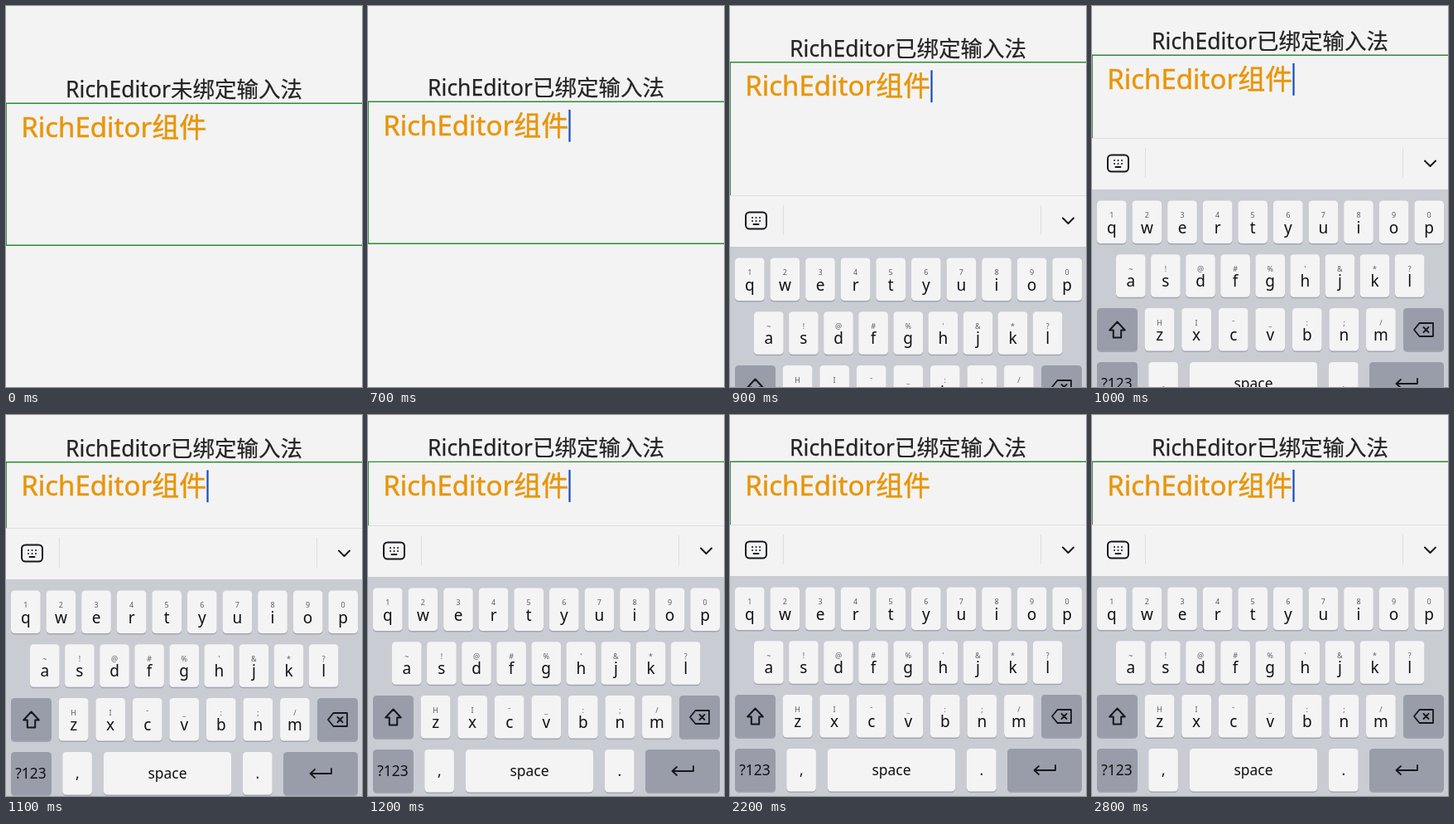
Animation, 430 px wide and 459 px high, one loop 2.9 s. Source, as an HTML page:

```html
<!DOCTYPE html>
<html lang="zh-CN">
<head>
<meta charset="utf-8">
<title>RichEditor</title>
<style>
  html, body { margin: 0; width: 100%; height: 100%; overflow: hidden; background: #f3f3f3; }
  svg { display: block; width: 430px; height: 459px; }
  text { font-family: "Noto Sans", "Noto Sans CJK SC", "Noto Sans CJK", sans-serif; fill: #111; }
  .mid { text-anchor: middle; }
  #title { font-size: 26.5px; fill: #242424; stroke: #242424; stroke-width: .25; }
  .content { font-size: 33px; fill: #e8960a; stroke: #e8960a; stroke-width: .5; }
  .hint { font-size: 9px; fill: #5c5e63; }
  .letter { font-size: 19px; }
  .word { font-size: 17.4px; }
  .icon { fill: none; stroke: #15171a; stroke-width: 2; stroke-linejoin: round; stroke-linecap: round; }
  .rule { stroke: #dddee0; }
</style>
</head>
<body>
<svg viewBox="0 0 430 459">
  <rect width="430" height="459" fill="#f3f3f3"/>
  <!-- Origin: top border of the editor -->
  <g id="editor">
    <text id="title" class="mid" x="215" y="-7.2"></text>
    <path d="M431 0H.2V171H431" fill="none" stroke="#2c8c35" stroke-width="1.4"/>
    <text class="content" x="18.2" y="40.5">RichEditor组件</text>
    <rect id="caret" x="242.4" y="9.7" width="2.2" height="38.8" fill="#164fb8"/>
  </g>
  <!-- Origin: top edge of the toolbar -->
  <g id="keyboard">
    <rect width="430" height="62" fill="#f3f3f4"/>
    <path class="rule" d="M0 .5H430M64.5 12V48M375.5 12V48"/>
    <rect y="62" width="430" height="270" fill="#c9ccd3"/>
    <g id="keys"></g>
    <g class="icon">
      <rect x="19" y="20.5" width="25" height="20" rx="4.5"/>
      <path d="M27 27h.1M31.5 27h.1M36 27h.1M27 31h.1M31.5 31h.1M36 31h.1M28.5 35h6" stroke-width="1.9"/>
      <path d="M402 27.5l6.5 6.5l6.5-6.5"/>
      <path d="M30.5 221.5l9.3 10h-4.6v9h-9.4v-9h-4.6z"/>
      <path d="M389 231l6.5-8h16.5v16h-16.5zM400.5 228l6 6M406.5 228l-6 6" stroke-width="1.8"/>
      <path d="M393 290v6h-25M373 291l-5.5 5l5.5 5" stroke-width="1.8"/>
    </g>
  </g>
</svg>
<script>
const LOOP = 2900, STEP = 100;
const byId = id => document.getElementById(id);
const [editor, title, caret, keyboard, keys] =
  ['editor', 'title', 'caret', 'keyboard', 'keys'].map(byId);

function add(tag, attrs, text = '') {
  const node = document.createElementNS('http://www.w3.org/2000/svg', tag);
  for (const name in attrs) node.setAttribute(name, attrs[name]);
  node.textContent = text;
  keys.append(node);
}

function addKey(x, y, width, fill = '#f4f4f5') {
  const box = { x, width, height: 51.5, rx: 4.5 };
  add('rect', { ...box, y: y + 1.5, fill: '#a3a7b1' });
  add('rect', { ...box, y, fill });
}

function addRow(letters, hints, x, y, pitch) {
  [...letters].forEach((letter, i) => {
    const left = x + i * pitch, center = left + 17.8;
    addKey(left, y, 35.6);
    add('text', { class: 'mid hint', x: center, y: y + 20.5 }, hints[i]);
    add('text', { class: 'mid letter', x: center, y: y + 39 }, letter);
  });
}

const DARK = '#999da9';
addRow('qwertyuiop', '1234567890', 6, 75.5, 42.6);
addRow('asdfghjkl', "~!@#%'&*?", 29, 140.3, 42.1);
addRow('zxcvbnm', 'HIˉ_:;/', 63.8, 205, 44.55);
addKey(6, 205, 49, DARK);
addKey(376, 205, 49, DARK);

addKey(6, 270, 49, DARK);
addKey(68.3, 270, 35.6);
addKey(118, 270, 154);
addKey(286, 270, 35.6);
addKey(335, 270, 90, DARK);
[['?123', 30], [',', 86.3], ['space', 195], ['.', 303.8]].forEach(([label, x]) =>
  add('text', { class: 'mid word', x, y: 301.5 }, label));

// [start ms, editor y, keyboard y]
const slide = [
  [0, 117.3, 459], [700, 115.2, 459], [800, 89, 346], [900, 67.7, 228],
  [1000, 59.3, 159], [1100, 56.7, 136], [1200, 56.4, 133], [1300, 56.2, 132],
];
// [start ms, caret visible]
const blink = [[0, 0], [700, 1], [1400, 0], [1800, 1], [2200, 0], [2700, 1]];
const at = (table, t) => table.findLast(([start]) => start <= t);

function draw(now) {
  const t = Math.floor((now % LOOP) / STEP) * STEP;
  const [, editorY, keyboardY] = at(slide, t);
  editor.setAttribute('transform', `translate(0 ${editorY})`);
  keyboard.setAttribute('transform', `translate(0 ${keyboardY})`);
  caret.setAttribute('opacity', at(blink, t)[1]);
  const label = `RichEditor${t < 700 ? '未' : '已'}绑定输入法`;
  if (title.textContent !== label) title.textContent = label;
}

let origin;
function tick(now) {
  origin ??= now;
  draw(now - origin);
  requestAnimationFrame(tick);
}
draw(0);
requestAnimationFrame(tick);
</script>
</body>
</html>
```
